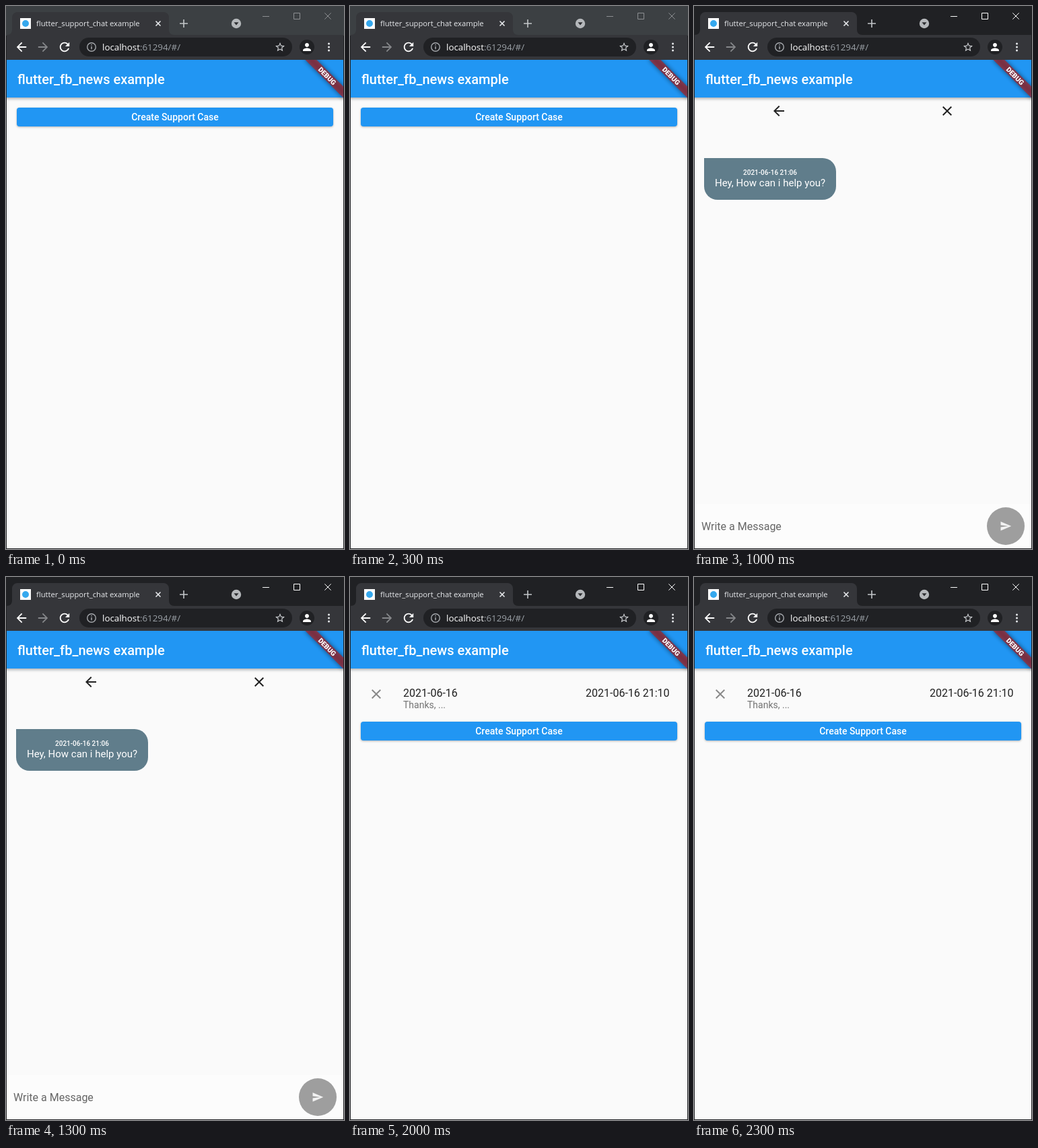
An HTML page for the animation above (2500 ms loop, 502 by 807 pixels).

```html
<!DOCTYPE html>
<html lang="en">
<head>
<meta charset="utf-8">
<title>Support chat</title>
<style>
html, body { margin: 0; width: 100%; height: 100%; overflow: hidden; background: #fafafa; }
svg { display: block; width: 502px; height: 807px; font-family: Roboto, sans-serif; }
.ui { font-family: "Open Sans", sans-serif; }
.mid { text-anchor: middle; }
.med { font-weight: 500; }
.ink { fill: rgba(0, 0, 0, .87); }
.soft { fill: rgba(0, 0, 0, .54); }
.blue { fill: #2196f3; }
.slate { fill: #607d8b; }
.red { fill: #f44336; }
.stamp { font-size: 10px; font-weight: 500; text-anchor: middle; }
.chat { font-size: 15px; fill: #fff; }
.bar { filter: drop-shadow(0 2px 2px rgba(0, 0, 0, .3)); }
.btn { filter: drop-shadow(0 1.5px 1.5px rgba(0, 0, 0, .28)); }
.dialog { filter: drop-shadow(0 9px 14px rgba(0, 0, 0, .38)); }

/* Each step is visible for a fifth of the loop. */
.step { visibility: hidden; animation: show 2.5s step-end infinite; animation-delay: calc(var(--n) * .5s - 2.5s); }
@keyframes show {
  0% { visibility: visible; }
  20%, 100% { visibility: hidden; }
}
.win { fill: none; stroke: #fff; animation: focus 2.5s step-end infinite; }
@keyframes focus {
  0% { stroke: #8d8f92; }
  20%, 100% { stroke: #fff; }
}
</style>
</head>
<body>
<svg viewBox="0 0 502 807">
  <defs>
    <clipPath id="page"><rect x="1" y="80" width="500" height="726"/></clipPath>
    <clipPath id="card"><rect x="94" y="384" width="314" height="118.500" rx="4"/></clipPath>
    <filter id="blur" x="-20%" y="-100%" width="140%" height="300%"><feGaussianBlur stdDeviation="3.5"/></filter>

    <!-- Icons, centred on the origin of a 24 unit box -->
    <path id="back" transform="translate(-12 -12)" d="M20 11H7.830l5.590-5.590L12 4l-8 8 8 8 1.410-1.410L7.830 13H20z"/>
    <path id="close" transform="translate(-12 -12)" d="M19 6.410L17.590 5 12 10.590 6.410 5 5 6.410 10.590 12 5 17.590 6.410 19 12 13.410 17.590 19 19 17.590 13.410 12z"/>
    <path id="reload" transform="translate(-12 -12)" d="M17.650 6.350C16.200 4.900 14.210 4 12 4c-4.420 0-7.990 3.580-7.990 8s3.570 8 7.990 8c3.730 0 6.840-2.550 7.730-6h-2.080c-.82 2.330-3.040 4-5.650 4-3.310 0-6-2.690-6-6s2.690-6 6-6c1.660 0 3.140.69 4.220 1.780L13 11h7V4z"/>
    <path id="star" transform="translate(-12 -12)" d="M22 9.240l-7.190-.62L12 2 9.190 8.630 2 9.240l5.460 4.730L5.820 21 12 17.270 18.180 21l-1.630-7.030zM12 15.400l-3.760 2.270 1-4.280-3.320-2.880 4.380-.38L12 6.100l1.710 4.040 4.380.38-3.320 2.880 1 4.280z"/>
    <path id="person" transform="translate(-12 -12)" d="M12 12c2.210 0 4-1.790 4-4s-1.790-4-4-4-4 1.790-4 4 1.790 4 4 4zm0 2c-2.670 0-8 1.340-8 4v2h16v-2c0-2.660-5.330-4-8-4z"/>
    <path id="message" transform="translate(-12 -12)" d="M20 2H4c-1.100 0-2 .9-2 2v18l4-4h14c1.100 0 2-.9 2-2V4c0-1.100-.9-2-2-2zm-2 12H6v-2h12zm0-3H6V9h12zm0-3H6V6h12z"/>
    <path id="check" transform="translate(-12 -12)" d="M9 16.170L4.830 12l-1.420 1.410L9 19 21 7l-1.410-1.410z"/>
    <path id="send" transform="translate(-12 -12)" d="M2 21L23 12 2 3v7l15 2-15 2z"/>

    <g id="button">
      <rect class="blue btn" x="16" y="151" width="470" height="28" rx="4"/>
      <text class="mid med" x="251" y="170" font-size="14" fill="#fff">Create Support Case</text>
    </g>

    <g id="chat">
      <use href="#back" x="126" y="156" class="ink"/>
      <use href="#close" x="376" y="156" class="ink"/>
      <path class="slate" d="M15 226H191a20 20 0 0 1 20 20V268a20 20 0 0 1-20 20H35a20 20 0 0 1-20-20z"/>
      <g class="chat">
        <text class="stamp" x="113" y="251">2021-06-16 21:06</text>
        <text x="31" y="268">Hey, How can i help you?</text>
      </g>
      <rect x="1" y="740" width="500" height="66" fill="#fcfcfc"/>
      <text x="11" y="779" font-size="16" fill="rgba(0,0,0,.6)">Write a Message</text>
      <circle cx="463" cy="773" r="28" fill="#9e9e9e"/>
      <use href="#send" transform="translate(463 773) scale(.75)" fill="#f2f2f2"/>
    </g>
  </defs>

  <!-- Browser frame -->
  <rect width="502" height="807" fill="#202124"/>
  <rect class="step" style="--n:0" width="502" height="44" fill="#3c4043"/>
  <path d="M1 43C6 43 9 40 9 35V17a8 8 0 0 1 8-8H234a8 8 0 0 1 8 8V35c0 5 3 8 8 8H501V80H1z" fill="#35363a"/>
  <rect x="21" y="18" width="16" height="16" fill="#fff"/>
  <circle cx="29" cy="26" r="5" fill="#35a8ee"/>
  <g class="ui">
    <text x="45" y="30" font-size="11.230" fill="#e8eaed">flutter_support_chat example</text>
  </g>
  <path d="M222.500 22.500l7 7m0-7l-7 7" stroke="#e8eaed" stroke-width="1.600"/>
  <path d="M258 26h12m-6-6v12" stroke="#c4c7ca" stroke-width="1.600"/>
  <circle cx="342" cy="26" r="7.200" fill="#b5b8bb"/>
  <path d="M338.500 24.200h7l-3.500 4.300z" fill="#2b2c2f"/>
  <path class="win" d="M381 15.500h10M427.500 10.500h9v9h-9zM473.300 10.300l9.400 9.400m0-9.400l-9.400 9.400"/>

  <use href="#back" transform="translate(23 61) scale(.9)" fill="#fff"/>
  <use href="#back" transform="translate(55 61) scale(-.9 .9)" fill="#85878a"/>
  <use href="#reload" transform="translate(87 61) scale(.9)" fill="#fff"/>
  <rect x="109" y="47" width="316" height="28" rx="14" fill="#202124"/>
  <circle cx="127" cy="61" r="6.300" fill="none" stroke="#a5a8ac" stroke-width="1.400"/>
  <path d="M127 60v4.300m0-7.300v1.600" stroke="#a5a8ac" stroke-width="1.500"/>
  <text class="ui" x="143" y="66" font-size="13.350" fill="#fff">localhost<tspan fill="#9aa0a6">:61294/#/</tspan></text>
  <use href="#star" transform="translate(407 61) scale(.7)" fill="#d0d3d6"/>
  <circle cx="447" cy="61" r="11" fill="#202124"/>
  <use href="#person" transform="translate(447 61) scale(.74)" fill="#fff"/>
  <g fill="#e8eaed">
    <circle cx="479.500" cy="56" r="1.500"/>
    <circle cx="479.500" cy="61" r="1.500"/>
    <circle cx="479.500" cy="66" r="1.500"/>
  </g>

  <!-- App -->
  <g clip-path="url(#page)">
    <rect x="1" y="80" width="500" height="726" fill="#fafafa"/>
    <rect class="blue bar" x="-9" y="70" width="520" height="66"/>
    <text class="med" x="17" y="116" font-size="20" fill="#fff">flutter_fb_news example</text>

    <use href="#button" class="step" style="--n:0"/>

    <g class="step" style="--n:1">
      <use href="#message" x="39" y="174" fill="#8a8a8a"/>
      <g class="ink" font-size="16">
        <text x="79" y="178">2021-06-16</text>
        <text x="350" y="178">2021-06-16 21:06</text>
      </g>
      <text class="soft" x="79" y="195" font-size="14">Hey, How can i help you?</text>
      <use href="#button" y="64"/>
    </g>

    <use href="#chat" class="step" style="--n:2"/>

    <g class="step" style="--n:3">
      <use href="#chat"/>
      <path class="red" d="M70 308H487V386a20 20 0 0 1-20 20H70a20 20 0 0 1-20-20V328a20 20 0 0 1 20-20z"/>
      <path class="slate" d="M15 426H334a20 20 0 0 1 20 20V486a20 20 0 0 1-20 20H35a20 20 0 0 1-20-20z"/>
      <g class="chat">
        <text class="stamp" x="268.500" y="333">2021-06-16 21:09</text>
        <text x="66" y="350">Hello,</text>
        <text x="66" y="386">I have a problem with ASCII Code, it is not displayed correctly</text>
        <text x="31" y="468">Thanks,</text>
        <text x="31" y="486">I found the error</text>
      </g>
      <rect x="1" y="80" width="500" height="726" fill="rgba(0,0,0,.54)"/>
      <rect class="dialog" x="94" y="384" width="314" height="118.500" rx="4" fill="#fff"/>
      <circle cx="380" cy="475" r="35.500" fill="#f1f1f1" clip-path="url(#card)"/>
      <text class="ink" x="118" y="419" font-size="16">Do you really want to close this case?</text>
      <circle cx="332" cy="475" r="10" fill="#212121"/>
      <use href="#close" transform="translate(332 475) scale(.71)" fill="#fff"/>
      <use href="#check" x="380" y="475" class="ink"/>
    </g>

    <g class="step" style="--n:4">
      <use href="#close" x="39" y="174" fill="#8a8a8a"/>
      <g class="ink" font-size="16">
        <text x="79" y="178">2021-06-16</text>
        <text x="350" y="178">2021-06-16 21:10</text>
      </g>
      <text class="soft" x="79" y="195" font-size="14">Thanks, ...</text>
      <use href="#button" y="64"/>
    </g>

    <!-- Corner ribbon -->
    <g transform="translate(501 80) rotate(45)">
      <rect x="-40" y="28" width="80" height="12" fill="rgba(0,0,0,.5)" filter="url(#blur)"/>
      <rect x="-40" y="28" width="80" height="12" fill="rgba(183,28,28,.63)"/>
      <text class="mid" y="37.600" font-size="10.200" font-weight="900" fill="#fff">DEBUG</text>
    </g>
  </g>
</svg>
</body>
</html>
```
